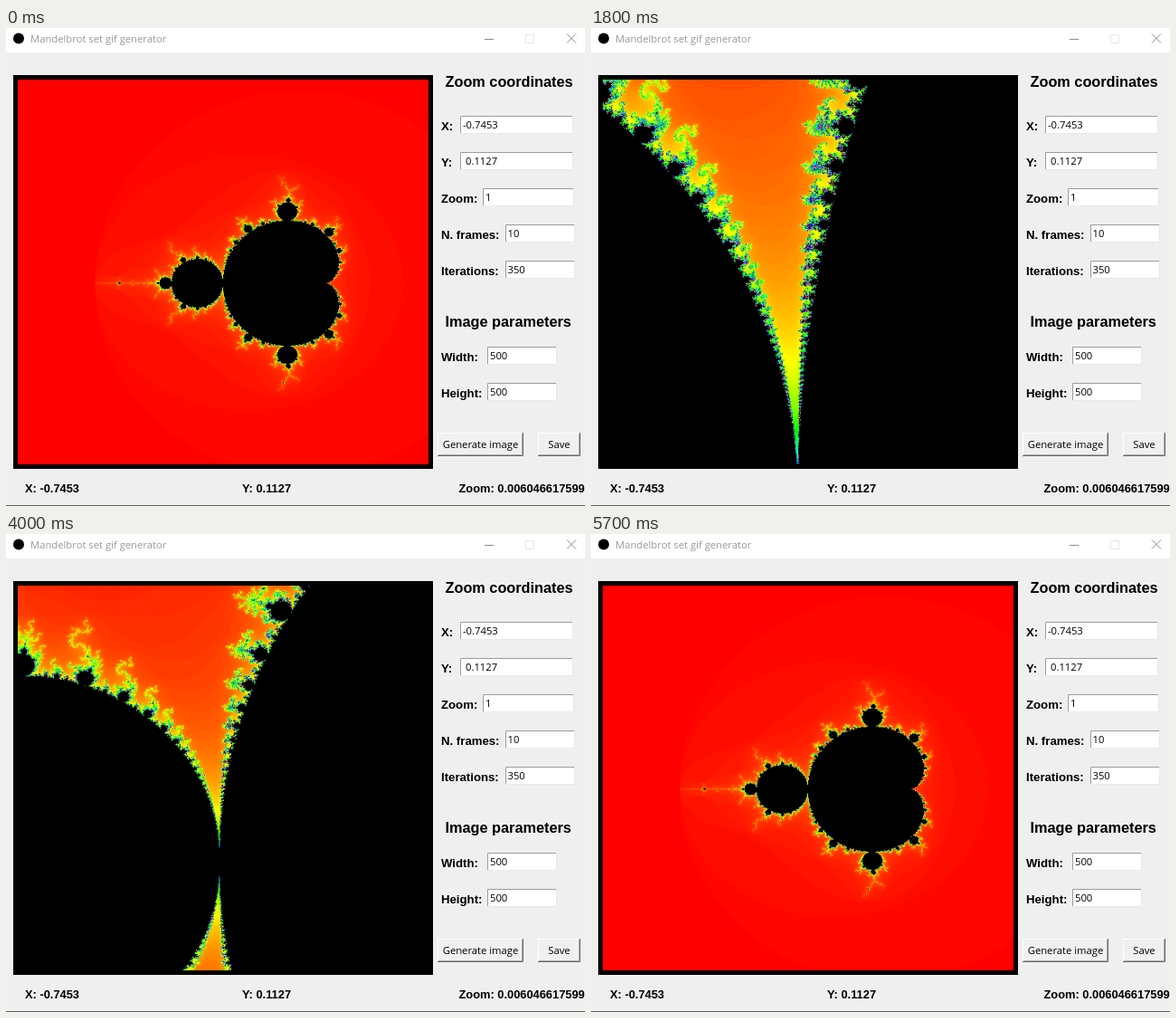
Write an HTML page with a canvas that moves like this. It is 640x528 px and loops after 5900 ms.

```html
<!DOCTYPE html>
<html lang="en">
<head>
<meta charset="utf-8">
<title>Mandelbrot set gif generator</title>
<style>
  html, body { margin: 0; width: 100%; height: 100%; overflow: hidden; background: #efefef; }
  svg, canvas { position: absolute; display: block; }
  svg { left: 0; top: 0; }
  canvas { left: 8px; top: 52px; background: #000; }
  .ui { font: 11.25px "Open Sans", "Noto Sans", sans-serif; }
  .label { font: bold 13.2px "Liberation Sans", Arial, sans-serif; }
  .head { font: bold 16.3px "Liberation Sans", Arial, sans-serif; }
  .status { font: bold 12.85px "Liberation Sans", Arial, sans-serif; }
</style>
</head>
<body>
<svg id="ui" width="640" height="528" viewBox="0 0 640 528">
  <rect width="640" height="27" fill="#fff"/>
  <circle cx="14" cy="11.5" r="6"/>
  <text class="ui" x="27" y="16" fill="#999">Mandelbrot set gif generator</text>
  <g fill="none" stroke="#8c8c8c">
    <path d="M529 12.5h10"/>
    <path d="M574.5 7.5h9v9h-9z" stroke="#e6e6e6"/>
    <path d="M620 6.5l10 10M630 6.5l-10 10"/>
  </g>
  <path d="M0 527.5h640" stroke="#606060"/>
  <text class="head" x="485.5" y="65">Zoom coordinates</text>
  <text class="head" x="485.5" y="330">Image parameters</text>
  <text class="status" x="21" y="513">X: -0.7453</text>
  <text class="status" x="261" y="513">Y: 0.1127</text>
  <text class="status" x="500.5" y="513">Zoom: 0.006046617599</text>
</svg>
<canvas id="view" width="464" height="435"></canvas>
<script>
const ui = document.getElementById('ui');
const add = markup => ui.insertAdjacentHTML('beforeend', markup);

function bevel(x, y, w, h, fill, light, dark) {
  const r = x + w - 0.5, b = y + h - 0.5;
  add(`<rect x="${x}" y="${y}" width="${w}" height="${h}" fill="${fill}"/>
    <path d="M${x + 0.5} ${b}V${y + 0.5}H${r}" fill="none" stroke="${light}"/>
    <path d="M${x} ${b}H${r}V${y}" fill="none" stroke="${dark}"/>`);
}

function field(name, value, x, y, right, pad = 3) {
  add(`<text class="label" x="481" y="${y + 16}">${name}:</text>`);
  bevel(x, y, right - x, 20, '#fff', '#9c9c9c', '#e8e8e8');
  add(`<text class="ui" x="${x + pad}" y="${y + 14}">${value}</text>`);
}

function button(name, x, w) {
  bevel(x, 447, w, 26, '#f0f0f0', '#fff', '#696969');
  add(`<path d="M${x + 1} 471.5h${w - 2.5}V448" fill="none" stroke="#a8a8a8"/>
    <text class="ui" x="${x + w / 2}" y="464" text-anchor="middle">${name}</text>`);
}

field('X', '-0.7453', 502, 97, 627);
field('Y', '0.1127', 502, 137, 627, 6);
field('Zoom', '1', 527, 177, 628);
field('N. frames', '10', 552, 217, 629, 2.5);
field('Iterations', '350', 552, 257, 629, 2.5);
field('Width', '500', 532, 352, 609);
field('Height', '500', 532, 392, 609);
button('Generate image', 477, 95);
button('Save', 588, 47);

const CX = -0.7453, CY = 0.1127, LIMIT = 350, SIZE = 500, STEPS = 10;
const LOOP = 5900, TICK = 100, HOLD = 287, LEAD = 165;

function escapeCount(a, b) {
  // Skip the cardioid and the period-2 disc
  const b2 = b * b, q = (a - 0.25) ** 2 + b2;
  if (q * (q + a - 0.25) <= b2 / 4 || (a + 1) ** 2 + b2 <= 1 / 16) return LIMIT;
  let x = 0, y = 0, n = 0;
  while (n < LIMIT && x * x + y * y <= 4) {
    const t = x * x - y * y + a;
    y = 2 * x * y + b;
    x = t;
    n++;
  }
  return n;
}

function hueColor(n) {
  const h = (n - 1) * 6 / 256;
  return [0, 4, 2].map(k => {
    const d = Math.abs((h + k) % 6 - 3) - 1;
    return 255 * Math.min(1, Math.max(0, d));
  });
}

const palette = Array.from({ length: LIMIT + 1 }, (_, n) => n < LIMIT ? hueColor(n) : [0, 0, 0]);

function render(step) {
  const tile = document.createElement('canvas');
  tile.width = tile.height = SIZE;
  const g = tile.getContext('2d'), img = g.createImageData(SIZE, SIZE);
  const half = 2 * 0.6 ** step;
  for (let j = 0, p = 0; j < SIZE; j++) {
    const b = CY + half * (1 - 2 * j / SIZE);
    for (let i = 0; i < SIZE; i++, p += 4) {
      const a = CX + half * (2 * i / SIZE - 1);
      img.data.set(palette[escapeCount(a, b)], p);
      img.data[p + 3] = 255;
    }
  }
  g.putImageData(img, 0, 0);
  return tile;
}

const tiles = Array.from({ length: STEPS }, (_, i) => render(i));
const view = document.getElementById('view').getContext('2d');
view.imageSmoothingQuality = 'high';
let shown = -1;

function draw(now) {
  const t = Math.floor(now % LOOP / TICK) * TICK;
  const step = Math.floor((t + LEAD) / HOLD) % STEPS;
  if (step !== shown) {
    view.drawImage(tiles[step], 5, 5, 454, 425);
    shown = step;
  }
}

let start;
function tick(now) {
  start ??= now;
  draw(now - start);
  requestAnimationFrame(tick);
}
draw(0);
requestAnimationFrame(tick);
</script>
</body>
</html>
```
